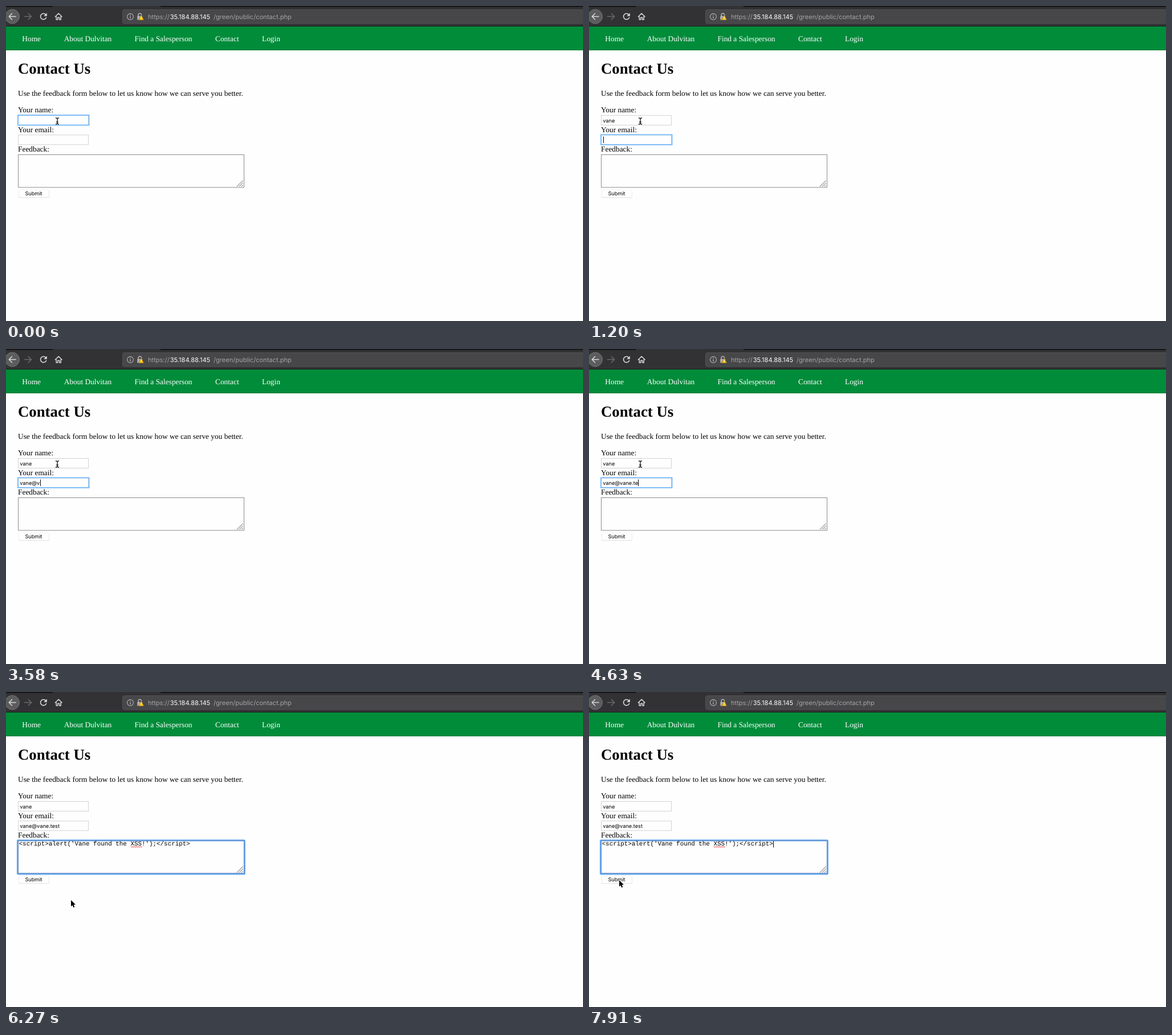
Recreate the animation shown at these times as an HTML page. Size 1012 by 554 pixels, loop 8000 ms.

```html
<!DOCTYPE html>
<html lang="en">
<head>
<meta charset="utf-8">
<title>Contact Us</title>
<style>
  html, body { margin: 0; width: 100%; height: 100%; overflow: hidden; background: #fefefe; }
  svg { display: block; width: 1012px; height: 554px; }
  text { font: 13.38px "Liberation Serif", "Times New Roman", serif; text-rendering: geometricPrecision; }
  .ui { font: 9.2px Inter, "Open Sans", sans-serif; }
  .menu text { font: 9.95px Inter, "Open Sans", sans-serif; }
  .url { font: 11.1px Inter, "Open Sans", sans-serif; fill: #a4a4a6; }
  .mono { font: 10.88px "Liberation Mono", "Courier New", monospace; }
  .h1 { font-weight: bold; font-size: 26.77px; }
  .nav text { fill: #fff; }
  .line { fill: none; stroke: #d7d7db; stroke-width: 1.6; stroke-linecap: round; stroke-linejoin: round; }
  .box { fill: #fefefe; stroke: #d3d3d3; }
  .ring { fill: none; stroke: #7dbcf5; stroke-width: 2; }
  .menu rect { fill: #fff; filter: drop-shadow(0 3px 3px rgba(0,0,0,.5)) drop-shadow(0 0 .5px rgba(0,0,0,.4)); }
</style>
</head>
<body>
<svg viewBox="0 0 1012 554">
  <!-- browser bar -->
  <rect width="1012" height="36" fill="#323234"/>
  <path d="M0 0H82V1.5H0ZM271 0H1012V1.5H271Z" fill="#0c0c0d"/>
  <rect y="35" width="1012" height="1" fill="#1c1c1e"/>
  <circle cx="11" cy="18.5" r="12.5" fill="#5c5c5e" stroke="#757577"/>
  <path class="line" d="M17 18.5H5.5M10.5 13.3L5.3 18.5L10.5 23.7"/>
  <path class="line" style="stroke:#69696b" d="M32.5 18.5H44M39.3 13.3L44.5 18.5L39.3 23.7"/>
  <path class="line" d="M69.8 15.2A5.2 5.2 0 1 0 70.6 20.2"/>
  <path d="M71.8 12.2V17.8H66.2Z" fill="#d7d7db"/>
  <path class="line" style="stroke-width:1.5" d="M86.3 18.8L92.2 13L98.1 18.8M88.2 18.5V24H90.8V20.3H93.6V24H96.2V18.5"/>
  <rect x="204.5" y="6.5" width="820" height="24.5" rx="3" fill="#474749" stroke="#515153"/>
  <circle cx="218" cy="18.8" r="5.4" fill="none" stroke="#b4b4b6" stroke-width="1.1"/>
  <path d="M218 18V22M218 15.6V16.9" stroke="#b4b4b6" stroke-width="1.3"/>
  <path d="M232 18V15.8A2.8 2.8 0 0 1 237.6 15.8V18" fill="none" stroke="#b4b4b6" stroke-width="1.5"/>
  <rect x="230.3" y="17.5" width="9" height="7" rx="1" fill="#b4b4b6"/>
  <path d="M237.1 15.8L242 24.8H232.2Z" fill="#ffbf00" stroke="#474749" stroke-width=".6"/>
  <path d="M237.1 18.8V21.8M237.1 22.7V23.8" stroke="#fff" stroke-width="1.1"/>
  <text class="url" x="249" y="23">https://</text>
  <text class="url" x="287.7" y="23" style="fill:#f9f9fa">35.184.88.145</text>
  <text class="url" x="364" y="23">/green/public/contact.php</text>

  <!-- page -->
  <rect y="36" width="1012" height="42" fill="#018c3a"/>
  <rect y="77" width="1012" height="1" fill="#0a8039"/>
  <g class="nav">
    <text x="28.3" y="62">Home</text>
    <text x="101.7" y="62">About Dulvitan</text>
    <text x="225.5" y="62">Find a Salesperson</text>
    <text x="367" y="62">Contact</text>
    <text x="449" y="62">Login</text>
  </g>
  <text class="h1" x="21" y="119">Contact Us</text>
  <text x="21" y="158">Use the feedback form below to let us know how we can serve you better.</text>
  <text x="21" y="187.3">Your name:</text>
  <text x="21" y="221.6">Your email:</text>
  <text x="21" y="255.8">Feedback:</text>
  <rect class="box" x="21.5" y="192.5" width="123" height="17"/>
  <rect class="box" x="21.5" y="226.8" width="123" height="17"/>
  <rect class="box" x="21.5" y="261.5" width="396" height="57.5" style="stroke:#8c8c8c"/>
  <path d="M405 317.5L415.5 307M409 317.5L415.5 311M413 317.5L415.5 315" stroke="#555" stroke-width="1"/>
  <rect x="22" y="324" width="53.5" height="13.2" rx="2" fill="#d4d4d4"/>
  <rect x="22.3" y="323.4" width="52.9" height="13" rx="2" fill="#fff" stroke="#ebebeb" stroke-width=".6"/>
  <text class="ui" x="33.4" y="333.2">Submit</text>

  <rect class="ring" id="nameRing" x="21" y="192" width="124.5" height="17.5"/>
  <rect class="ring" id="emailRing" x="21" y="226.4" width="124.5" height="17.5"/>
  <g id="msgRing">
    <rect class="ring" x="20.4" y="261" width="398" height="59" rx="1" style="stroke:#69aaf2;stroke-width:3"/>
    <rect x="21.5" y="261.5" width="396" height="57.5" fill="none" stroke="#5681b4" stroke-width=".8"/>
  </g>

  <text class="ui" id="name" x="24.2" y="204.5"></text>
  <text class="ui" id="email" x="24.2" y="238.8"></text>
  <text class="mono" id="msg" x="22.6" y="270.4"></text>
  <path id="wavy" d="M219 271.6l1.65 1.6l1.65 -1.6l1.65 1.6l1.65 -1.6l1.65 1.6l1.65 -1.6l1.65 1.6l1.65 -1.6l1.65 1.6l1.65 -1.6l1.65 1.6l1.65 -1.6" fill="none" stroke="#f22" stroke-width="1"/>
  <rect id="caret" width="1" height="11.5"/>

  <g class="menu" id="nameMenu">
    <rect x="21" y="209.3" width="124" height="16.7"/>
    <text x="25" y="221.2">vane</text>
  </g>
  <g class="menu" id="emailMenu">
    <rect x="21" y="243.4" width="124" height="50.2"/>
    <text x="25" y="255.4">vane@zapped.test</text>
    <text x="25" y="272.2">vane@zox.test</text>
    <text x="25" y="289">holt.vane@plomi.test</text>
  </g>

  <g id="beam" fill="none" stroke-linecap="round">
    <path d="M-2.7 -5.5Q-.2 -5.5 0 -4V4Q-.2 5.5 -2.7 5.5M2.7 -5.5Q.2 -5.5 0 -4M0 4Q.2 5.5 2.7 5.5M-1.5 1.8H1.5" stroke="#fff" stroke-width="2.4"/>
    <path d="M-2.7 -5.5Q-.2 -5.5 0 -4V4Q-.2 5.5 -2.7 5.5M2.7 -5.5Q.2 -5.5 0 -4M0 4Q.2 5.5 2.7 5.5M-1.5 1.8H1.5" stroke="#000" stroke-width="1.2"/>
  </g>
  <path id="arrow" d="M0 0V11.3L2.6 8.9L4.3 12.9L6.3 12L4.6 8.1H8Z" stroke="#fff" stroke-width="1.4" paint-order="stroke"/>
</svg>
<script>
const LOOP = 8000;
const $ = id => document.getElementById(id);
const script = "<script>alert('Vane found the XSS!');<\/script>";

// Each step changes only the listed parts of the state.
const steps = [
  [0, { focus: "name", name: "", email: "", msg: "", menu: "", wavy: false, caret: false, pointer: "beam", at: [90, 202.3] }],
  [450, { name: "v", menu: "name", caret: true }],
  [600, { name: "va" }],
  [750, { name: "van" }],
  [900, { name: "vane" }],
  [1200, { focus: "email", menu: "" }],
  [1800, { caret: false }],
  [2390, { email: "v", menu: "email", caret: true }],
  [2540, { email: "va" }],
  [2690, { email: "van" }],
  [2840, { email: "vane" }],
  [2980, { email: "vane@" }],
  [3430, { email: "vane@v" }],
  [3580, { menu: "" }],
  [3730, { email: "vane@va" }],
  [3880, { email: "vane@van" }],
  [4030, { email: "vane@vane" }],
  [4180, { email: "vane@vane." }],
  [4630, { email: "vane@vane.te" }],
  [4780, { email: "vane@vane.test" }],
  [4930, { focus: "msg" }],
  [5530, { msg: script }],
  [5680, { wavy: true }],
  [5980, { caret: false, at: [95, 236] }],
  [6130, { at: [106, 308] }],
  [6270, { pointer: "arrow", at: [114, 366] }],
  [6420, { at: [116, 381] }],
  [6570, { caret: true }],
  [7170, { caret: false, at: [112, 378] }],
  [7320, { at: [97, 366] }],
  [7470, { at: [79, 350] }],
  [7610, { at: [63, 338] }],
  [7760, { caret: true, at: [55, 333] }],
  [7910, { at: [53, 331] }]
];
const fields = ["name", "email", "msg"];
const caretTop = { name: 195.2, email: 229.5, msg: 262 };
const show = (id, on) => $(id).style.display = on ? "" : "none";

function draw(index) {
  const s = Object.assign({}, ...steps.slice(0, index + 1).map(step => step[1]));
  for (const id of fields) {
    $(id).textContent = s[id];
    show(id + "Ring", s.focus === id);
  }
  show("nameMenu", s.menu === "name");
  show("emailMenu", s.menu === "email");
  show("wavy", s.wavy);
  show("caret", s.caret);
  const field = $(s.focus);
  const width = s[s.focus] ? field.getComputedTextLength() : 0;
  $("caret").setAttribute("x", Math.round(+field.getAttribute("x") + width + .3));
  $("caret").setAttribute("y", caretTop[s.focus]);
  for (const id of ["beam", "arrow"]) {
    show(id, s.pointer === id);
    $(id).setAttribute("transform", `translate(${s.at})`);
  }
}

const start = performance.now();
let shown = -1;
function tick() {
  const t = (performance.now() - start) % LOOP;
  let index = 0;
  while (index + 1 < steps.length && steps[index + 1][0] <= t) index++;
  if (index !== shown) draw(shown = index);
  requestAnimationFrame(tick);
}
tick();
</script>
</body>
</html>
```
